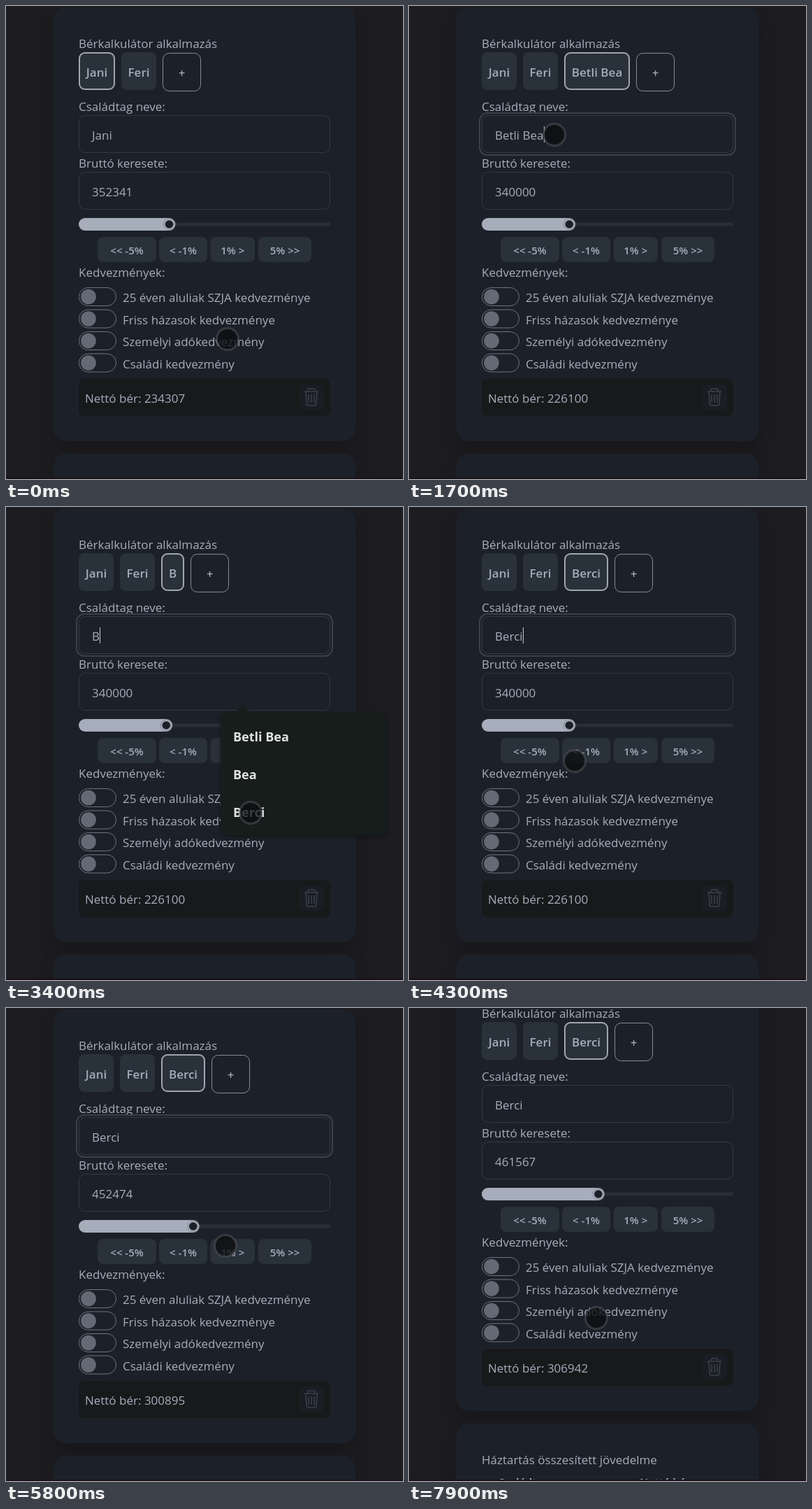
Write an HTML page with a canvas that moves like this. It is 568 by 676 pixels and loops after 8000 ms.

```html
<!DOCTYPE html>
<html lang="hu">
<head>
<meta charset="utf-8">
<style>
html, body { margin: 0; width: 100%; height: 100%; overflow: hidden; background: #1d1d21; }
canvas { display: block; }
</style>
</head>
<body>
<canvas id="stage" width="568" height="676"></canvas>
<script>
const ctx = document.getElementById('stage').getContext('2d');
const LOOP = 8000, STEP = 100;
const PAGE = '#1d1d21', CARD = '#1c2129', BUTTON = '#29313a', TEXT = '#a6adbb', LINE = '#333942';
const MEMBERS = ['Jani', 'Feri'];
const FULL_NAME = 'Betli Bea', PICKED = 'Berci';
const SUGGESTIONS = [FULL_NAME, 'Bea', PICKED];
const DISCOUNTS = ['25 éven aluliak SZJA kedvezménye', 'Friss házasok kedvezménye',
  'Személyi adókedvezmény', 'Családi kedvezmény'];

// Times of the user's actions
const ADD = 600, FOCUS = 1300, ERASE = 1900, SUGGEST = 2700, PICK = 3500,
  DRAG = 4700, DROP = 5300, CLICK1 = 6200, CLICK2 = 6500, SCROLL = 7700;

// Pointer path: time, x, y
const PATH = [
  [0, 317, 476], [500, 254, 96], [800, 254, 96], [1300, 208, 184], [2800, 208, 184],
  [3400, 350, 437], [3600, 350, 437], [4300, 237, 363], [4500, 230, 313], [DRAG, 230, 313],
  [DROP, 268, 313], [5500, 268, 313], [5800, 314, 340], [6100, 315, 351],
  [6900, 315, 351], [7600, 268, 443], [LOOP, 268, 443]
];

const ease = p => p * p * (3 - 2 * p);
const progress = (t, from, to) => Math.min(1, Math.max(0, (t - from) / (to - from)));

function pointerAt(t) {
  const i = PATH.findIndex(p => p[0] > t);
  const [t0, x0, y0] = PATH[i - 1], [t1, x1, y1] = PATH[i];
  const p = ease(progress(t, t0, t1));
  return [x0 + (x1 - x0) * p, y0 + (y1 - y0) * p];
}

function grossAt(t) {
  if (t < ADD) return 352341;
  if (t >= CLICK2) return 461567;
  if (t >= CLICK1) return 456998;
  return Math.round(340000 + 112474 * ease(progress(t, DRAG, DROP)));
}

function nameAt(t) {
  if (t < ADD) return MEMBERS[0];
  if (t >= PICK) return PICKED;
  const erased = t < ERASE ? 0 : Math.floor((t - ERASE) / 100) + 1;
  return FULL_NAME.slice(0, Math.max(1, FULL_NAME.length - erased));
}

function box(x, y, w, h, r, fill, stroke, width = 1) {
  ctx.beginPath();
  ctx.roundRect(x, y, w, h, r);
  if (fill) { ctx.fillStyle = fill; ctx.fill(); }
  if (stroke) { ctx.strokeStyle = stroke; ctx.lineWidth = width; ctx.stroke(); }
}

function disc(x, y, r, fill, stroke, width) {
  box(x - r, y - r, 2 * r, 2 * r, r, fill, stroke, width);
}

function setFont(size, weight) {
  ctx.font = `${weight} ${size}px "Open Sans", "Noto Sans", sans-serif`;
}

function text(s, x, y, { size = 17, weight = 400, color = TEXT, align = 'left' } = {}) {
  setFont(size, weight);
  ctx.fillStyle = color;
  ctx.textAlign = align;
  ctx.fillText(s, x, y);
}

function card(y, h) {
  ctx.save();
  ctx.shadowColor = 'rgba(0,0,0,.22)';
  ctx.shadowBlur = 26;
  ctx.shadowOffsetY = 12;
  box(68, y, 432, h, 18, CARD);
  ctx.restore();
}

function tabs(names, active) {
  let x = 104;
  names.forEach((name, i) => {
    const on = i === active;
    setFont(17, 600);
    const w = Math.round(ctx.measureText(name).width + (on ? 22 : 19.5));
    box(x, 66, w, 54, 8, BUTTON);
    if (on) box(x + 1, 67, w - 2, 52, 8, null, '#a0a6b1', 2);
    text(name, x + w / 2, 101, { weight: 600, align: 'center' });
    x += w + 9;
  });
  box(x + .5, 67.5, 54, 54, 9, null, '#858b96');
  text('+', x + 27.5, 102, { size: 16, weight: 600, align: 'center' });
}

function field(label, value, y) {
  text(label, 104, y - 6);
  box(104.5, y + .5, 359, 53, 9, null, LINE);
  text(value, 123, y + 35);
}

function slider(gross) {
  const x = 113 + 342 * gross / 1e6;
  box(104, 309.5, 360, 5, 2.5, '#2a2f37');
  box(104, 303, x - 95, 18, 9, TEXT);
  disc(x, 312, 8, null, '#838995', 1);
  disc(x, 312, 5.8, '#1b2027');
}

function stepButton(label, x, w) {
  box(x, 330, w, 36, 8, BUTTON);
  text(label, x + w / 2, 355, { size: 15, weight: 600, align: 'center' });
}

function discount(label, i) {
  const y = 402 + 31.5 * i;
  box(104.5, y + .5, 53, 26, 13, null, '#6e747f');
  disc(118, y + 13.5, 10.8, '#646975');
  text(label, 167, Math.round(y + 21));
}

function trash() {
  box(419, 541, 36, 36, 8, '#1a1d23');
  ctx.strokeStyle = '#3b414b';
  ctx.lineWidth = 1.5;
  ctx.stroke(new Path2D('M427 551H447M432 551V549Q432 547 434 547H440Q442 547 442 549V551' +
    'M429 551L430 568Q430 571 433 571H441Q444 571 444 568L445 551M433 555V567M437 555V567M441 555V567'));
}

function suggestions() {
  ctx.save();
  ctx.shadowColor = 'rgba(0,0,0,.4)';
  ctx.shadowBlur = 6;
  ctx.shadowOffsetY = 2;
  box(307, 294, 237, 175, 9, '#171d1b');
  ctx.restore();
  ctx.fillStyle = '#171d1b';
  ctx.fill(new Path2D('M326 295L337 284Q339 282 341 284L352 295Z'));
  SUGGESTIONS.forEach((s, i) =>
    text(s, 325, 335 + 54 * i, { size: 18, weight: 700, color: '#e0e3e5' }));
}

function pointer(t) {
  const [x, y] = pointerAt(t);
  disc(x, y, 15.5, 'rgba(11,13,16,.78)', 'rgba(82,85,90,.55)', 3);
}

function draw(t) {
  const name = nameAt(t), gross = grossAt(t), added = t >= ADD;
  ctx.fillStyle = PAGE;
  ctx.fillRect(0, 0, 568, 676);

  ctx.save();
  ctx.translate(0, -Math.round(46 * progress(t, SCROLL, 7900) ** 1.5));
  card(2, 620);
  card(640, 300);
  text('Bérkalkulátor alkalmazás', 104, 60);
  tabs(added ? [...MEMBERS, name] : MEMBERS, added ? 2 : 0);
  field('Családtag neve:', name, 156);
  if (t >= FOCUS && t < CLICK1) {
    box(101, 153, 366, 60, 11, null, '#3a4049', 2);
    if (Math.floor((t - FOCUS) / 500) % 2 === 0) {
      setFont(17, 400);
      ctx.fillStyle = '#c5cad2';
      ctx.fillRect(Math.round(123 + ctx.measureText(name).width), 172, 1, 23);
    }
  }
  field('Bruttó keresete:', gross, 237);
  slider(gross);
  stepButton('<< -5%', 131, 84);
  stepButton('< -1%', 219, 69);
  stepButton('1% >', 292.5, 63.5);
  stepButton('5% >>', 361, 76);
  text('Kedvezmények:', 104, 387);
  DISCOUNTS.forEach(discount);
  box(104, 533, 360, 53, 8, '#18191b');
  text('Nettó bér: ' + Math.round(gross * .665), 113, 567);
  trash();
  text('Háztartás összesített jövedelme', 104, 698);
  text('Családtag', 127, 729, { size: 15, weight: 700 });
  text('Nettó bér', 330, 729, { size: 15, weight: 700 });
  ctx.restore();

  if (t >= SUGGEST && t < PICK) suggestions();
  pointer(t);
  ctx.fillStyle = '#190f18';
  ctx.fillRect(0, 674, 568, 2);
}

function tick() {
  const t = performance.now() % LOOP;
  draw(Math.floor(t / STEP) * STEP);
  requestAnimationFrame(tick);
}
tick();
</script>
</body>
</html>
```
